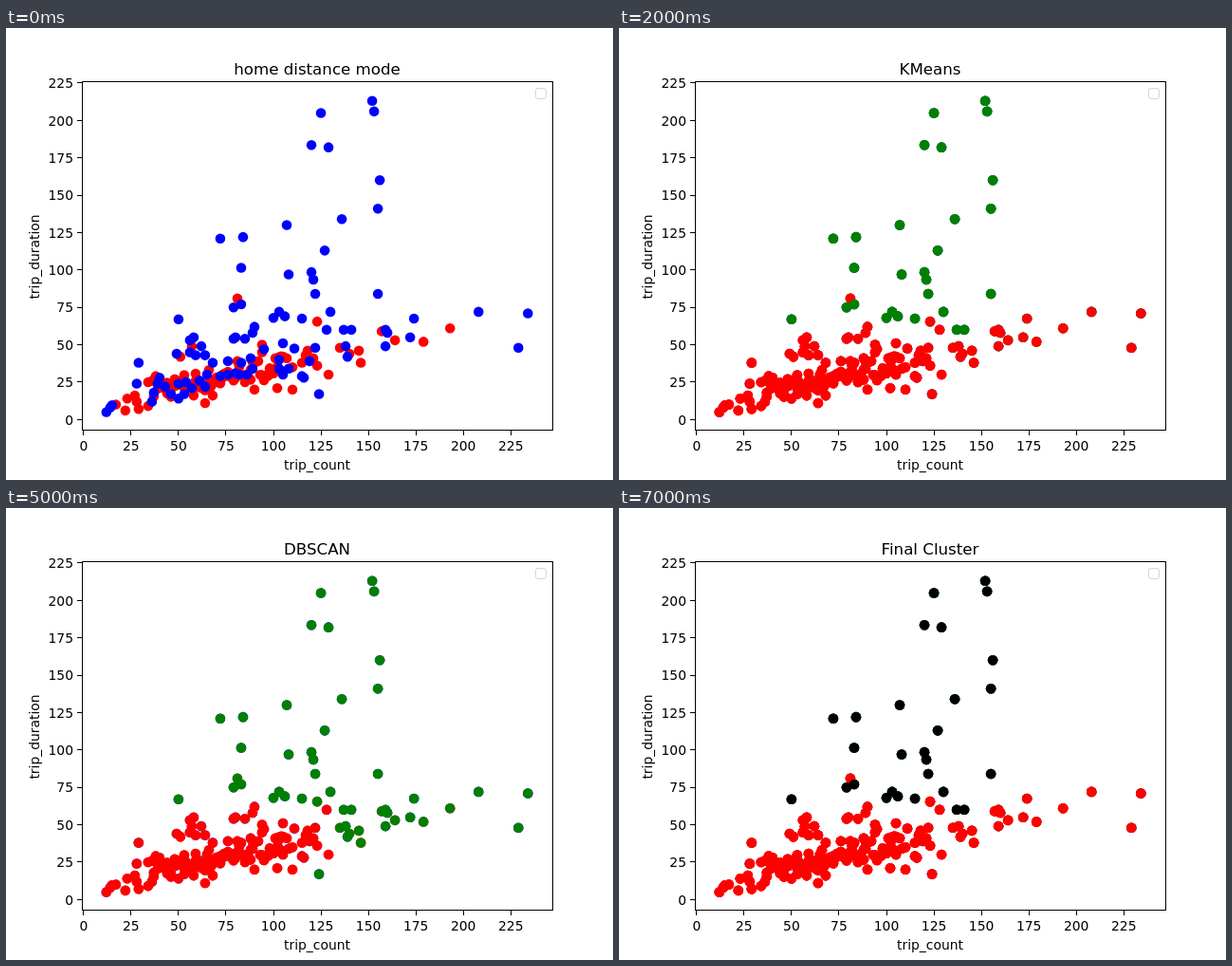
An HTML page with a canvas that plays this animation: 640 px wide and 476 px high, repeating every 8 s.

```html
<!DOCTYPE html>
<html lang="en">
<head>
<meta charset="utf-8">
<style>
  html, body { margin: 0; width: 100%; height: 100%; overflow: hidden; background: #fff; }
  canvas { display: block; }
</style>
</head>
<body>
<canvas id="chart" width="640" height="476"></canvas>
<script>
const ctx = document.getElementById('chart').getContext('2d');
const FONT = '"DejaVu Sans", sans-serif';
const RED = '#f00', BLUE = '#00f', GREEN = '#008000', BLACK = '#000';

// Series are flat x, y pairs in data units.
const far = [
  152,213, 153,206, 125,205, 120,183.5, 129,182, 156,160, 155,141, 136,134, 107,130, 84,122,
  72,121, 127,113, 83,101.5, 108,97, 120,98.5, 121,93.5, 122,84, 155,84, 79,75, 83,77,
  50,67, 100,68, 103,72, 106,69, 115,67.5, 130,72, 137,60, 141,60];
const sparseBlue = [
  174,67.5, 172,55, 208,72, 234,71, 229,48, 159,60, 160,58, 159,49, 138,49, 139,42, 124,17];
const sparseRed = [
  81,81, 123,65.5, 157,59, 164,53, 179,52, 193,61, 135,48, 140,44, 145,46, 146,38];
const denseBlue = [
  12,5, 14,8, 15,9.5, 29,38, 28,24, 36,12, 37,18, 40,28, 39,24, 43,22, 46,17,
  49,44, 50,14, 50,24, 53,17, 54,25, 56,45, 56,53, 58,55, 59,43, 57,21, 62,49,
  64,43, 61,26, 64,22, 65,30, 68,38, 72,29, 76,39, 76,30, 79,54, 80,55, 85,54,
  89,58, 90,62, 80,31, 82,30, 83,38, 86,30, 88,41, 89,34, 95,47, 105,51, 103,40,
  103,34, 105,30, 108,34, 111,47.5, 115,29, 116,28, 119,39, 122,48, 128,60];
const denseRed = [
  17,10, 22,6, 23,14, 27,16, 28,12, 29,7, 34,9, 34,25, 38,29, 51,42, 57,49, 58,16,
  64,11, 68,16, 81,39, 94,50, 94,45, 90,20, 97,29, 102,21, 110,20, 107,41, 110,35,
  115,38, 118,46, 117,43, 121,41, 123,36, 129,30];

// Fill the crowded core of the red series.
let seed = 7;
const random = () => (seed = seed * 16807 % 2147483647) / 2147483647;
for (let i = 0; i < 62; i++) {
  const x = Math.round(36 + 70 * (i + random()) / 62);
  denseRed.push(x, 12 + (x - 36) * 0.24 + random() * 15);
}

const scenes = [
  ['home distance mode', [[sparseRed, RED], [denseRed, RED], [far, BLUE], [sparseBlue, BLUE], [denseBlue, BLUE]]],
  ['DBSCAN', [[denseRed, RED], [denseBlue, RED], [far, GREEN], [sparseBlue, GREEN], [sparseRed, GREEN]]],
  ['KMeans', [[denseRed, RED], [denseBlue, RED], [sparseBlue, RED], [sparseRed, RED], [far, GREEN]]],
  ['Final Cluster', [[denseRed, RED], [denseBlue, RED], [sparseBlue, RED], [sparseRed, RED], [far, BLACK]]]
];

const px = x => 81.8 + x * 2.002;
const py = y => 412.3 - y * 1.575;

function text(str, x, y, size = 13.89, align = 'center') {
  ctx.font = `${size}px ${FONT}`;
  ctx.textAlign = align;
  ctx.fillStyle = BLACK;
  ctx.fillText(str, x, y);
}

function line(x1, y1, x2, y2) {
  ctx.beginPath();
  ctx.moveTo(x1, y1);
  ctx.lineTo(x2, y2);
  ctx.stroke();
}

function dots(points, color) {
  ctx.fillStyle = color;
  for (let i = 0; i < points.length; i += 2) {
    ctx.beginPath();
    ctx.arc(px(points[i]), py(points[i + 1]), 5.3, 0, 2 * Math.PI);
    ctx.fill();
  }
}

function axes() {
  ctx.strokeStyle = BLACK;
  ctx.lineWidth = 1;
  ctx.strokeRect(80.5, 56.5, 496, 367);
  for (let v = 0; v <= 225; v += 25) {
    const x = Math.floor(px(v)) + 0.5, y = Math.floor(py(v)) + 0.5;
    line(x, 424, x, 429);
    line(75, y, 80, y);
    text(v, px(v), 445);
    text(v, 71, py(v) + 5.2, 13.89, 'right');
  }
  text('trip_count', 328, 465);
  ctx.save();
  ctx.translate(35, 241);
  ctx.rotate(-Math.PI / 2);
  text('trip_duration', 0, 0);
  ctx.restore();
  ctx.strokeStyle = '#d5d5d5';
  ctx.beginPath();
  ctx.roundRect(558.5, 63.5, 11, 11, 2.5);
  ctx.stroke();
}

function draw(index) {
  ctx.fillStyle = '#fff';
  ctx.fillRect(0, 0, 640, 476);
  // Each scene paints over the ones before, leaving thin rims.
  for (const [, series] of scenes.slice(0, index + 1))
    for (const [points, color] of series) dots(points, color);
  axes();
  text(scenes[index][0], 328, 49, 16.67);
}

let shown = -1;
function frame() {
  const index = Math.floor(performance.now() / 1000) % scenes.length;
  if (index !== shown) draw(shown = index);
  requestAnimationFrame(frame);
}
frame();
</script>
</body>
</html>
```
